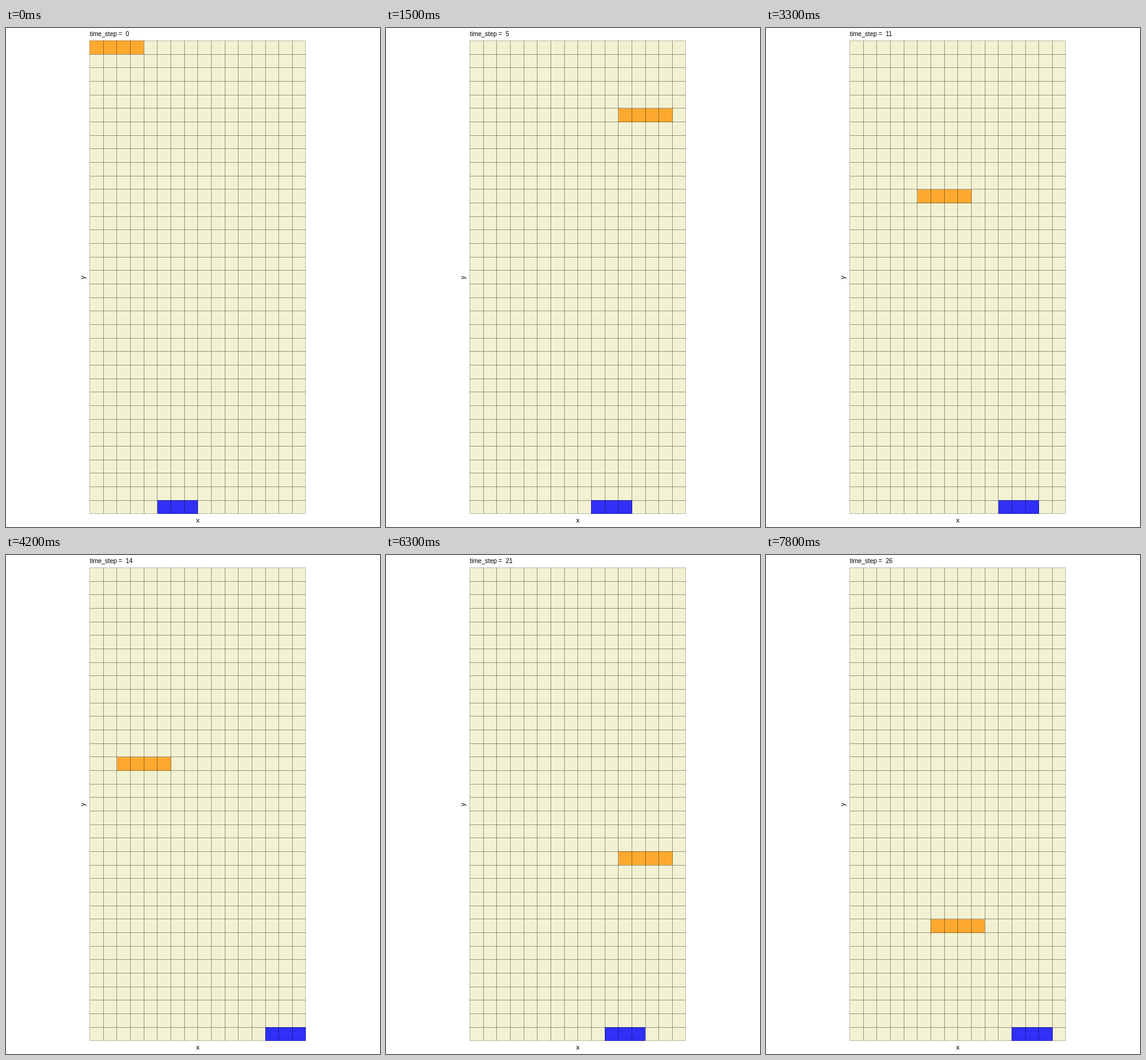
These frames come from a looping animation (600x800 px, 8 s). An HTML page with a canvas:

```html
<!DOCTYPE html>
<html lang="en">
<head>
<meta charset="utf-8">
<title>Grid steps</title>
<style>
html, body { margin: 0; width: 100%; height: 100%; overflow: hidden; background: #fff; }
canvas { display: block; }
</style>
</head>
<body>
<canvas id="stage" width="600" height="800"></canvas>
<script>
const ctx = document.getElementById('stage').getContext('2d');
const LOOP = 8000, STEP = 300;
const COLS = 16, ROWS = 35, CELL = 21.665;
const LEFT = 134.4, TOP = 20.4;
const WIDTH = COLS * CELL, HEIGHT = ROWS * CELL;
const FONT = '"Liberation Sans", Arial, sans-serif';

// [step, column] waypoints of the paddle
const PADDLE = [[0, 5], [5, 9], [9, 9], [14, 13], [18, 12], [21, 10], [26, 12]];

function paddleColumn(step) {
  const i = Math.max(1, PADDLE.findIndex(p => p[0] >= step));
  const [s0, c0] = PADDLE[i - 1], [s1, c1] = PADDLE[i];
  return Math.round(c0 + (c1 - c0) * (step - s0) / (s1 - s0));
}

function fillCells(col, row, count, color) {
  ctx.fillStyle = color;
  for (let i = 0; i < count; i++) {
    const x = Math.round(LEFT + (col + i) % COLS * CELL);
    const y = Math.round(TOP + row * CELL);
    ctx.fillRect(x, y, 22, 22);
  }
}

function drawGrid() {
  ctx.lineWidth = 1;
  ctx.strokeStyle = 'rgba(0, 0, 0, 0.36)';
  ctx.beginPath();
  for (let c = 1; c < COLS; c++) {
    const x = Math.floor(LEFT + c * CELL) + 0.5;
    ctx.moveTo(x, TOP);
    ctx.lineTo(x, TOP + HEIGHT);
  }
  for (let r = 1; r < ROWS; r++) {
    const y = Math.floor(TOP + r * CELL) + 0.5;
    ctx.moveTo(LEFT, y);
    ctx.lineTo(LEFT + WIDTH, y);
  }
  ctx.stroke();
  ctx.strokeStyle = 'rgba(0, 0, 0, 0.22)';
  ctx.strokeRect(134.5, 20.5, 346, 758);
}

function label(text, x, y, size, align) {
  ctx.font = size + 'px ' + FONT;
  ctx.textAlign = align;
  ctx.fillText(text, x, y);
}

function draw(step) {
  ctx.fillStyle = '#fff';
  ctx.fillRect(0, 0, 600, 800);
  ctx.fillStyle = '#f2f2d3';
  ctx.fillRect(134, 20, 347, 759);

  fillCells((2 * COLS - step) % COLS, step, 4, '#fda92f');
  fillCells(paddleColumn(step), ROWS - 1, 3, '#3030f6');
  drawGrid();

  ctx.fillStyle = '#000';
  label('time_step =  ' + step, 134.4, 13, 10, 'left');
  label('x', 307.7, 793, 11, 'center');
  ctx.save();
  ctx.translate(127, 400);
  ctx.rotate(-Math.PI / 2);
  label('y', 0, 0, 11, 'center');
  ctx.restore();
}

function tick() {
  draw(Math.floor(performance.now() % LOOP / STEP));
  requestAnimationFrame(tick);
}
tick();
</script>
</body>
</html>
```
